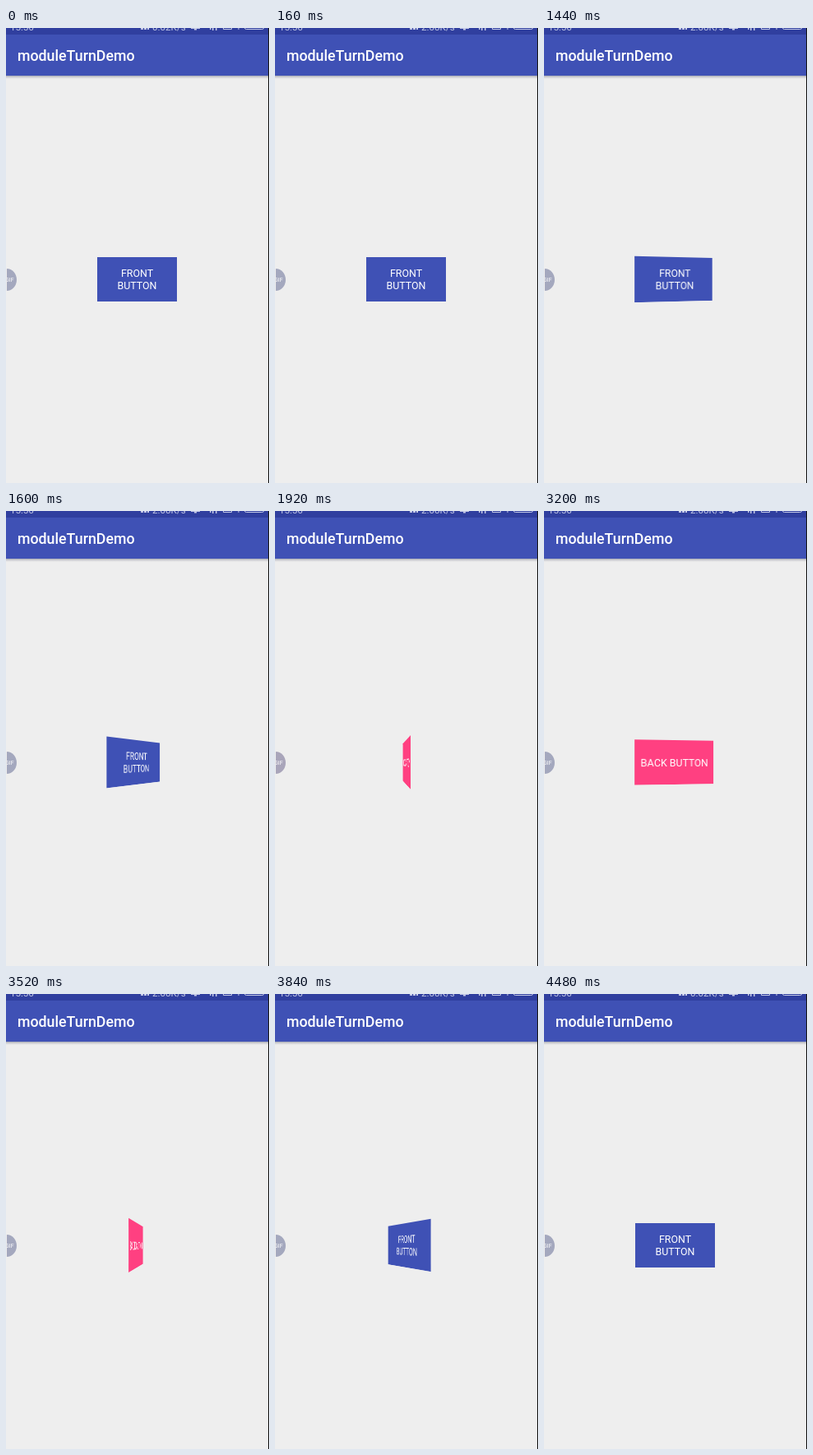
Write an HTML page that moves like this. It is 320 px wide and 554 px high and loops after 4.64 s.

```html
<!DOCTYPE html>
<html lang="en">
<head>
<meta charset="utf-8">
<title>Flip button</title>
<style>
  :root { --loop: 4640ms step-end infinite; }
  html, body { margin: 0; width: 100%; height: 100%; overflow: hidden; background: #eee; }
  .stage { position: relative; width: 320px; height: 554px; overflow: hidden; font-family: Roboto, sans-serif; color: #fff; }
  .stage > * { position: absolute; }

  .bar { left: 0; top: 0; width: 320px; height: 58px; background: linear-gradient(#303f9f 8px, #3f51b5 8px); }
  .shadow { left: 0; top: 58px; width: 320px; height: 4px; background: linear-gradient(#a3a6b4, #d2d2d4 45%, #eee); }
  .title { left: 14px; top: 24px; font-size: 17.78px; line-height: 21px; font-weight: 500; white-space: nowrap; }
  .status { left: 0; top: 0; }
  .edge { right: 0; top: 0; width: 1px; height: 100%; background: #111; }

  .badge { left: 1px; top: 293px; width: 11.5px; height: 27px; overflow: hidden; border-radius: 0 12px 12px 0 / 0 13.5px 13.5px 0;
    background: #a4a8be; font-size: 7px; line-height: 28px; text-indent: -2px; animation: tint var(--loop); }

  .scene { left: 111px; top: 279px; width: 97px; height: 54px; perspective: 256px; }
  .card { width: 100%; height: 100%; transform-style: preserve-3d; animation: flip var(--loop); }
  .face { position: absolute; inset: 0; box-sizing: border-box; padding-top: 2px;
    display: flex; align-items: center; justify-content: center; text-align: center;
    font-size: 12.44px; line-height: 14.6px; white-space: nowrap; backface-visibility: hidden; }
  .front { background: #3f51b5; }
  .back { background: #ff4081; transform: rotateY(180deg); }

  .idle { animation: idle var(--loop); }
  .busy { animation: busy var(--loop); }

  /* Each quarter turn is linear over 400 ms, with a short rest edge-on, shown every 160 ms. */
  @keyframes flip {
    0% { transform: rotateY(0deg); }
    31.03% { transform: rotateY(13deg); }
    34.48% { transform: rotateY(49deg); }
    37.93% { transform: rotateY(85deg); }
    41.37% { transform: rotateY(95.5deg); }
    44.82% { transform: rotateY(131.5deg); }
    48.27% { transform: rotateY(167.5deg); }
    51.72% { transform: rotateY(180deg); }
    68.96% { transform: rotateY(188deg); }
    72.41% { transform: rotateY(224deg); }
    75.86% { transform: rotateY(260deg); }
    79.31% { transform: rotateY(270deg); }
    82.75% { transform: rotateY(301.5deg); }
    86.2% { transform: rotateY(337.5deg); }
    89.65%, 100% { transform: rotateY(360deg); }
  }
  @keyframes tint {
    0%, 100% { background: #a4a8be; }
    41.37% { background: #a9a5ba; }
    51.72% { background: #b4a7bb; }
    68.96% { background: #a4a8be; }
  }
  @keyframes idle { 0% { opacity: 1; } 3.44% { opacity: 0; } 93.1%, 100% { opacity: 1; } }
  @keyframes busy { 0% { opacity: 0; } 3.44% { opacity: 1; } 93.1%, 100% { opacity: 0; } }
</style>
</head>
<body>
<div class="stage">
  <div class="bar"></div>
  <div class="shadow"></div>
  <svg class="status" width="320" height="8" fill="#c3c8e6" font-size="11.6">
    <text x="5" y="3">15:56</text>
    <path d="M164 0h3v2h-3zM168 0h3v2h-3zM172 0h2v2h-2z"/>
    <text class="idle" x="178" y="3">0.02K/s</text>
    <text class="busy" x="178" y="3">2.08K/s</text>
    <path d="M225 0h11v1h-11zM229 1h3v1.5h-3zM248 0h1.5v2h-1.5zM251 0h1.5v3h-1.5zM255 0h1.5v3h-1.5z"/>
    <path d="M264.5 0v1.5h10V0M283 0v2M290.5 0q0 1.5 2 1.5h19q2 0 2-1.5" fill="none" stroke="#c3c8e6"/>
  </svg>
  <div class="title">moduleTurnDemo</div>
  <div class="badge">GIF</div>
  <div class="scene">
    <div class="card">
      <div class="face front">FRONT<br>BUTTON</div>
      <div class="face back">BACK BUTTON</div>
    </div>
  </div>
  <div class="edge"></div>
</div>
</body>
</html>
```
